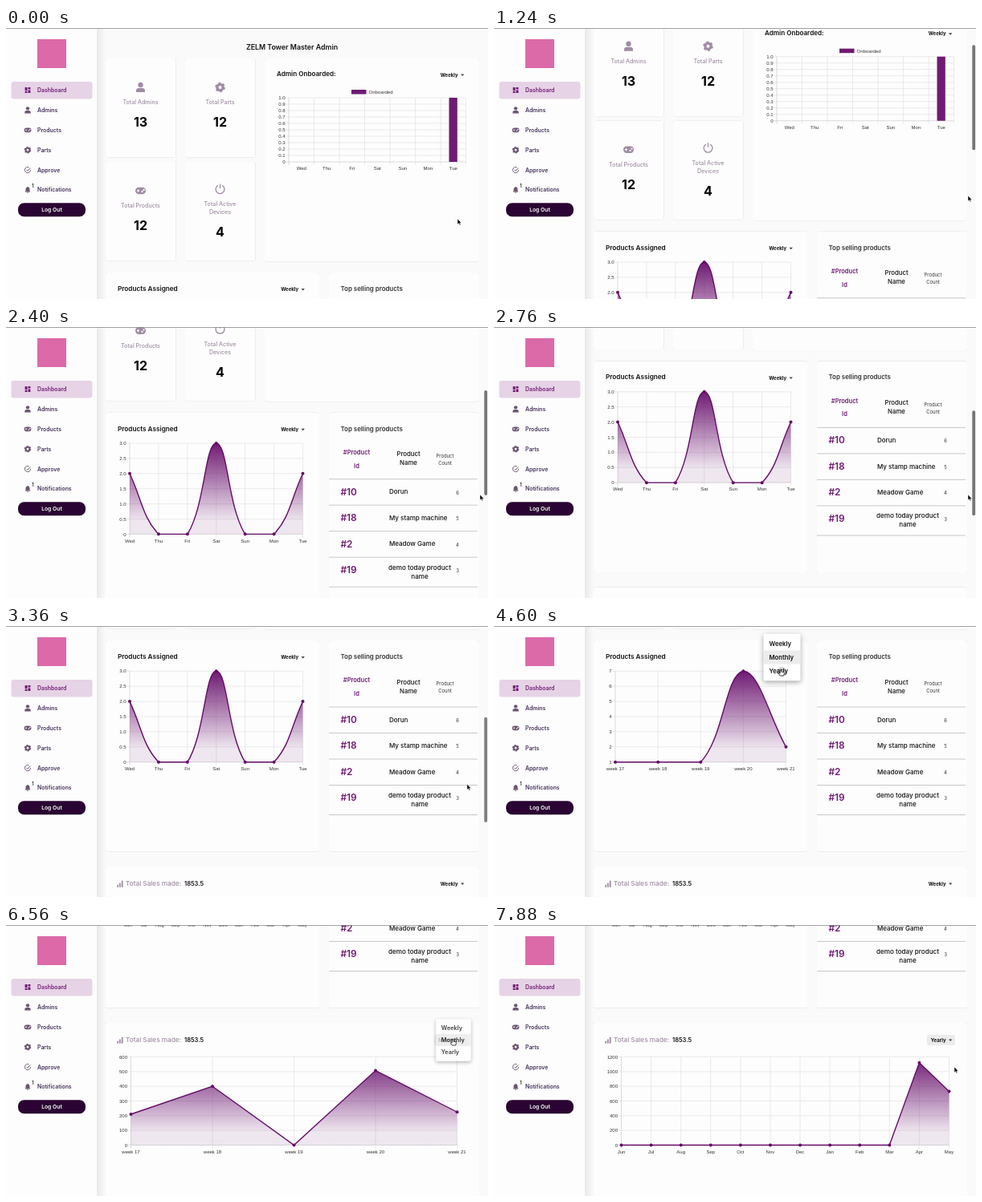
Recreate the animation shown at these times as an HTML page. Size 600x338 px, loop 7920 ms.

```html
<!DOCTYPE html>
<html lang="en">
<head>
<meta charset="utf-8">
<title>Dashboard</title>
<style>
html, body { margin: 0; width: 100%; height: 100%; overflow: hidden; background: #fafafa; }
svg { display: block; width: 600px; height: 338px; font-family: Inter, "Open Sans", sans-serif; }
.card { filter: drop-shadow(0 .9px .5px rgba(0,0,0,.24)); }
.menu { filter: drop-shadow(0 2px 3px rgba(0,0,0,.35)); }
.tick { font-family: "Liberation Sans", Arial, sans-serif; }
</style>
</head>
<body>
<svg id="stage" viewBox="0 0 600 338"></svg>
<script>
const LOOP = 7920, PURPLE = '#6f1b73', MUTED = '#a08ca4', INK = '#111', WHITE = '#fdfdfd';
const DAYS = ['Wed', 'Thu', 'Fri', 'Sat', 'Sun', 'Mon', 'Tue'];
const WEEKS = [17, 18, 19, 20, 21].map(n => 'week ' + n);
const MONTHS = 'Jun Jul Aug Sep Oct Nov Dec Jan Feb Mar Apr May'.split(' ');
const PERIODS = ['Weekly', 'Monthly', 'Yearly'];
const clamp = (v, a, b) => Math.min(b, Math.max(a, v));
const padded = (...tail) => [...Array(12 - tail.length).fill(0), ...tail];

// y is the middle of the capitals
const text = (s, x, y, size, fill = INK, weight = 600, anchor = 'start', more = '') =>
  `<text x="${x}" y="${y + size * .36}" font-size="${size}" fill="${fill}" font-weight="${weight}" text-anchor="${anchor}" ${more}>${s}</text>`;
const mid = (s, x, y, size, fill, weight) => text(s, x, y, size, fill, weight, 'middle');
const tick = (s, x, y, anchor) => text(s, x, y, 6, '#333', 400, anchor, 'class="tick"');
const rect = (x, y, w, h, fill, rx = 0, more = '') =>
  `<rect x="${x}" y="${y}" width="${w}" height="${h}" fill="${fill}" rx="${rx}" ${more}/>`;
const card = (x, y, w, h) => rect(x, y, w, h, WHITE, 2.5, 'class="card"');
const line = (x1, y1, x2, y2, stroke = '#dedede', w = .6) =>
  `<path d="M${x1} ${y1}L${x2} ${y2}" stroke="${stroke}" stroke-width="${w}"/>`;
const group = (id, body) => `<g id="${id}">${body}</g>`;

const ICONS = {
  dash: '<path d="M-5-5h4.3v6H-5zM.7-5H5v3.6H.7zM-5 2.3h4.3V5H-5zM.7 0H5v5H.7z"/>',
  person: '<circle cy="-3" r="3.2"/><path d="M-5.5 6V4Q-5.5 1-2 1H2Q5.5 1 5.5 4V6z"/>',
  pad: '<rect x="-6.5" y="-4.3" width="13" height="8.6" rx="4.2"/><path d="M-4.7 0h3.4M-3-1.7v3.4" stroke="#fff"/><path d="M1 1.2h2M3-1h2" stroke="#fff" stroke-width="1.8"/>',
  gear: '<g fill="none" stroke="currentColor"><circle r="3.6" stroke-width="3.2"/><circle r="5.2" stroke-width="2.2" stroke-dasharray="2.723"/></g>',
  power: '<path d="M-2.6-4.6A5.4 5.4 0 1 0 2.6-4.6M0-6.4V-1" fill="none" stroke="currentColor" stroke-width="1.3"/>',
  check: '<path d="M2-5A5.3 5.3 0 1 0 5.3 0M-2.4-.4L-.3 1.8L5-4" fill="none" stroke="currentColor" stroke-width="1.4"/>',
  bell: '<path d="M-5 3.6L-3.7 2V-1.5Q-3.5-4.4-.9-5V-6H.9V-5Q3.5-4.4 3.7-1.5V2L5 3.6zM-1.4 4.5H1.4Q1 6 0 6T-1.4 4.5z"/>',
  bars: '<path d="M-5 1.5h2.4V5.5H-5zM-1.4-1.5H1V5.5h-2.4zM2.4-5h2.4V5.5H2.4z"/>'
};
const icon = (name, x, y, k, color) =>
  `<g transform="translate(${x} ${y}) scale(${k})" fill="${color}" color="${color}">${ICONS[name]}</g>`;

// Smooth curve with its control points kept inside the plot
function curve(pts, tension, top, bottom) {
  const ctrl = pts.map((p, i) => {
    const a = pts[i - 1] || p, b = pts[i + 1] || p;
    const da = Math.hypot(p[0] - a[0], p[1] - a[1]), db = Math.hypot(b[0] - p[0], b[1] - p[1]);
    const at = k => [p[0] + k * (b[0] - a[0]), clamp(p[1] + k * (b[1] - a[1]), top, bottom)];
    return [at(-tension * da / (da + db)), at(tension * db / (da + db))];
  });
  return 'M' + pts[0] + pts.slice(1).map((p, i) => `C${ctrl[i][1]} ${ctrl[i + 1][0]} ${p}`).join('');
}

function grid(x0, x1, top, bottom, min, max, step, cols) {
  let out = '';
  const digits = step < 1 ? 1 : 0;
  for (let i = 0, n = Math.round((max - min) / step); i <= n; i++) {
    const v = min + i * step, y = bottom - (bottom - top) * i / n;
    out += line(x0 - 4, y, x1, y, i ? undefined : '#c4c4c4') + tick(v ? v.toFixed(digits) : 0, x0 - 4.5, y, 'end');
  }
  for (let i = 0; i <= cols; i++) {
    const x = x0 + (x1 - x0) * i / cols;
    out += line(x, top, x, bottom + 4, i ? undefined : '#c4c4c4');
  }
  return out;
}

const PLOTS = {
  items: { top: 343.3, bottom: 456.7, tension: .4, right: 375.5, y: 326, button: [357, 38] },
  sales: { top: 629.5, bottom: 739.5, tension: 0, right: 574, y: 608.5, button: [556, 143] }
};

function areaChart(name, period, x0, x1, min, max, step, values) {
  const { top, bottom, tension } = PLOTS[name], last = values.length - 1;
  const labels = [DAYS, WEEKS, MONTHS][period];
  const pts = values.map((v, i) =>
    [x0 + (x1 - x0) * i / last, bottom - (bottom - top) * (v - min) / (max - min)]);
  const path = curve(pts, tension, top, bottom);
  return group(name + period, grid(x0, x1, top, bottom, min, max, step, last) +
    `<path d="${path}L${x1} ${bottom}L${x0} ${bottom}z" fill="url(#${name}Fade)"/>` +
    `<path d="${path}" fill="none" stroke="#650b68" stroke-width="1.4"/>` +
    pts.map(([x, y], i) => `<circle cx="${x}" cy="${y}" r="2" fill="#650b68"/>` +
      tick(labels[i], x, bottom + 8.2, 'middle')).join(''));
}

const fade = name =>
  `<linearGradient id="${name}Fade" gradientUnits="userSpaceOnUse" x1="0" x2="0" y1="${PLOTS[name].top}" y2="${PLOTS[name].bottom}">` +
  `<stop stop-color="${PURPLE}"/><stop offset=".85" stop-color="${PURPLE}" stop-opacity=".1"/></linearGradient>`;

const picker = (id, right, y) =>
  rect(right - 35, y - 6.5, 35, 13, '#ececec', 2, `id="${id}Focus"`) +
  text('Weekly', right - 11.5, y, 6, INK, 700, 'end', `id="${id}Label"`) +
  `<path d="M${right - 8} ${y - .9}h4.4l-2.2 2.4z" fill="#444"/>`;
const plotPicker = id => picker(id, PLOTS[id].right, PLOTS[id].y);

const ROW = 17;
const menu = group('menu', rect(-23, -29.25, 46, 58.5, '#fff', 2, 'class="menu"') +
  rect(-23, 0, 46, ROW, '#ececec', 0, 'id="menuRow"') +
  PERIODS.map((p, i) => text(p, -16, (i - 1) * ROW, 7.7, INK, 600)).join(''));

function stats() {
  const cells = [['13', 'person', 'Total Admins'], ['12', 'gear', 'Total Parts'],
    ['12', 'pad', 'Total Products'], ['4', 'power', 'Total Active', 'Devices']];
  return cells.map(([count, ic, ...label], i) => {
    const x = 124 + i % 2 * 99, y = i < 2 ? 38 : 167, cx = x + 43.5;
    const iy = y + 38 - label.length * 2;
    return card(x, y, 87.5, 123.5) + icon(ic, cx, iy, 1, MUTED) +
      label.map((s, j) => mid(s, cx, iy + 18.3 + j * 10, 7.1, MUTED, 500)).join('') +
      mid(count, cx, iy + 33.5 + label.length * 10, 16, '#000', 700);
  }).join('');
}

function products() {
  const names = { '#10': 'Dorun', '#18': 'My stamp machine', '#2': 'Meadow Game', '#19': '' };
  return card(402, 305, 187, 263.5) + text('Top selling products', 416.5, 325, 7.9, '#333') +
    mid('#Product', 436.5, 354.5, 7.5, PURPLE) + mid('Id', 436.5, 371.3, 7.5, PURPLE) +
    mid('Product', 501, 357, 7.8, INK, 500) + mid('Name', 501, 368, 7.8, INK, 500) +
    mid('Product', 546.5, 359.3, 5.9, '#333', 400) + mid('Count', 546.5, 368, 5.9, '#333', 400) +
    Object.entries(names).map(([n, name], i) => {
      const y = 403.7 + i * 32.5;
      return line(402, y - 15.7, 587, y - 15.7, '#bbb', .8) + text(n, 416.5, y, 11.8, PURPLE) +
        text(name, 477, y, 8, INK, 500) + mid(6 - i, 562, y + 1, 6, '#333', 400);
    }).join('') + line(402, 522.5, 587, 522.5, '#bbb', .8) +
    mid('demo today product', 515, 498, 8.1, INK, 500) + mid('name', 515, 509, 8.1, INK, 500);
}

const page = () => mid('ZELM Tower Master Admin', 356, 24, 8.8) + stats() +
  card(322, 38, 267, 253.5) + text('Admin Onboarded:', 337, 57.5, 8.1) + picker('admins', 574, 58.5) +
  rect(430, 77, 18.5, 5.5, PURPLE) + tick('Onboarded', 451.5, 79.8) +
  grid(352, 572.5, 87, 167, 0, 1, .1, 7) + rect(551.5, 87, 10.3, 80, PURPLE) +
  DAYS.map((d, i) => tick(d, 352 + 31.5 * (i + .5), 175.3, 'middle')).join('') +

  card(124, 305, 266, 263.5) + text('Products Assigned', 139, 325, 8.2) + plotPicker('items') +
  areaChart('items', 0, 154, 369.5, 0, 3, .5, [2, 0, 0, 3, 0, 0, 2]) +
  areaChart('items', 1, 151, 363.5, 1, 7, 1, [1, 1, 1, 7, 2]) +
  areaChart('items', 2, 152, 369, 0, 14, 2, padded(3, 14, 10)) + products() +

  card(124, 587, 465, 262) + icon('bars', 142, 608.5, .75, MUTED) +
  text('Total Sales made:', 149, 608, 8.2, MUTED, 500) + text('1853.5', 222, 608, 7.5) + plotPicker('sales') +
  areaChart('sales', 0, 156, 568, 0, 200, 20, [0, 0, 0, 106, 0, 25, 200]) +
  areaChart('sales', 1, 155.5, 561.5, 0, 600, 100, [210, 400, 0, 507, 225]) +
  areaChart('sales', 2, 158.5, 566.5, 0, 1200, 200, padded(1122, 732));

function sidebar() {
  const items = { Dashboard: 'dash', Admins: 'person', Products: 'pad', Parts: 'gear', Approve: 'check', Notifications: 'bell' };
  return rect(113, 0, 11, 338, 'url(#edge)') + rect(0, 0, 113, 338, WHITE) +
    rect(39, 14, 36, 36, '#dc6aa8') + rect(6.5, 67, 101, 21.5, '#e6d3e6', 3) +
    Object.entries(items).map(([name, ic], i) => {
      const y = 77.5 + i * 24.9;
      return icon(ic, 27, y, .68, i ? '#6d5672' : PURPLE) + text(name, 39, y, 6.9, i ? '#45305a' : PURPLE);
    }).join('') + text('1', 32, 197, 6.5, INK, 500) +
    rect(15, 218.2, 84, 17, '#2a0432', 7.5) + mid('Log Out', 57, 226.8, 6.8, '#fff');
}

const stage = document.getElementById('stage');
stage.innerHTML = `<defs>${fade('items')}${fade('sales')}
  <linearGradient id="edge"><stop stop-opacity=".07"/><stop offset="1" stop-opacity="0"/></linearGradient></defs>` +
  rect(0, 0, 600, 338, '#fafafa') + group('page', page()) + sidebar() +
  rect(0, 0, 600, .8, '#8a8a8a') + rect(595.3, 0, 3.8, 131, '#757575', 1.9, 'id="thumb"') +
  menu + '<circle id="ripple" r="6" cx="358" cy="57" opacity=".18"/>' +
  group('cursor', '<path id="arrow" d="M0 0V7L1.6 5.6L2.7 8L3.8 7.5L2.8 5.2H5z" fill="#000" stroke="#fff" stroke-width=".5"/>' +
    '<path id="hand" d="M-.8 4V-.4Q0-1.3.8-.4V2L4 2.8Q4.6 3 4.4 4L3.7 7H-.6L-2.8 4.2Q-2.4 3-.8 4z" fill="#fff" stroke="#000" stroke-width=".7"/>');

const el = {};
stage.querySelectorAll('[id]').forEach(n => el[n.id] = n);
const show = (id, on) => el[id].style.display = on ? '' : 'none';

// Each visit opens a menu on its current row and picks the next one
const VISITS = [
  { id: 'items', open: 3700, pick: 3980, row: 0 },
  { id: 'items', open: 4300, pick: 4640, row: 1 },
  { id: 'sales', open: 6070, pick: 6270, row: 0 },
  { id: 'sales', open: 6490, pick: 6900, row: 1 }
];
const SCROLL = [[700, 0], [1960, 119.5], [2760, 262.5], [3260, 287], [5060, 287], [5400, 407], [5800, 465]];
const onVisit = ({ id, open, pick }) => {
  const [x, y] = PLOTS[id].button;
  return [[open - 20, x, y], [open + 60, x, y], [pick - 40, x, y + ROW], [pick + 20, x, y + ROW]];
};
const CURSOR = [[100, 562, 238], [600, 590, 209], [3300, 590, 209], ...VISITS.slice(0, 2).flatMap(onVisit),
  [5040, 591, 113], [5760, 591, 113], ...VISITS.slice(2).flatMap(onVisit), [7300, 573, 177]];

const smooth = u => u * u * (3 - 2 * u);
function along(keys, t, axis = 1, ease = u => u) {
  const i = keys.findIndex(k => k[0] > t);
  if (i === 0) return keys[0][axis];
  if (i < 0) return keys[keys.length - 1][axis];
  const a = keys[i - 1], b = keys[i];
  return a[axis] + (b[axis] - a[axis]) * ease((t - a[0]) / (b[0] - a[0]));
}
// Rises just before start and falls just after end
const pulse = (t, start, end) => clamp(Math.min((t - start) / 60 + 1, (end - t) / 140 + 1), 0, 1);

function setPicker(id, t) {
  const chosen = VISITS.filter(v => v.id === id && t >= v.pick).length;
  PERIODS.forEach((p, i) => show(id + i, i === chosen));
  el[id + 'Label'].textContent = PERIODS[chosen];
  const w = [37, 41, 35][chosen], focus = el[id + 'Focus'];
  focus.setAttribute('x', PLOTS[id].right - w);
  focus.setAttribute('width', w);
  show(id + 'Focus', chosen);
}

function drawMenu(t, s) {
  const visit = VISITS.find(v => t >= v.open && t < v.pick + 80);
  show('menu', visit);
  if (!visit) return;
  const { id, open, pick, row } = visit;
  const grow = 1 - (1 - clamp((t - open) / 130, 0, 1)) ** 2;
  const shown = grow * (1 - clamp((t - pick) / 80, 0, 1)), k = .75 + .25 * shown;
  el.menu.setAttribute('transform',
    `translate(${PLOTS[id].right - 17} ${PLOTS[id].y - s}) scale(${k} ${k * k}) translate(0 ${(1 - row) * ROW})`);
  el.menu.setAttribute('opacity', shown);
  el.menuRow.setAttribute('y', (row - 1.5) * ROW);
}

function draw(t) {
  const s = along(SCROLL, t);
  el.page.setAttribute('transform', `translate(0 ${-s})`);
  el.thumb.setAttribute('y', 1 + s * .393);
  el.thumb.setAttribute('opacity', Math.max(pulse(t, 700, 3350), pulse(t, 5100, 5880)));

  show('adminsFocus', false);
  setPicker('items', t);
  setPicker('sales', t);
  drawMenu(t, s);
  show('ripple', Math.abs(t - VISITS[1].pick) < 80);

  el.cursor.setAttribute('transform', `translate(${along(CURSOR, t, 1, smooth)} ${along(CURSOR, t, 2, smooth)})`);
  const pointing = [0, 2].some(i => t > VISITS[i].open - 60 && t < VISITS[i + 1].pick + 80);
  show('hand', pointing);
  show('arrow', !pointing);
}

const began = performance.now();
(function frame() {
  draw((performance.now() - began) % LOOP);
  requestAnimationFrame(frame);
})();
</script>
</body>
</html>
```
